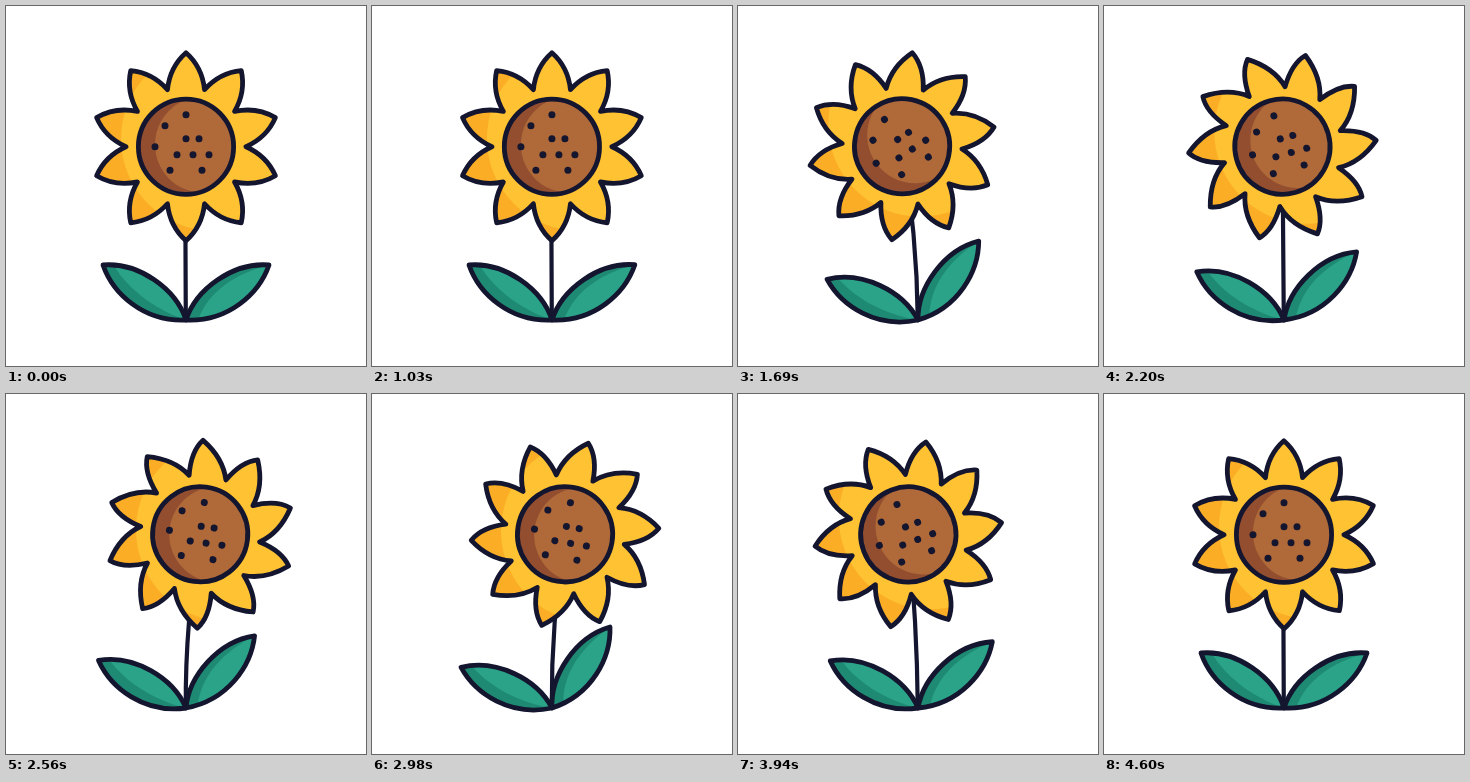
An HTML page with a canvas that plays this animation: 360 by 360 pixels, repeating every 4630 ms.

```html
<!DOCTYPE html>
<html>
<head>
<meta charset="utf-8">
<style>
html, body { margin: 0; height: 100%; overflow: hidden; background: #fff; }
canvas { display: block; width: 360px; height: 360px; }
</style>
</head>
<body>
<canvas width="360" height="360"></canvas>
<script>
const ctx = document.querySelector('canvas').getContext('2d');
const LOOP = 4630, INK = '#14152f', RAD = Math.PI / 180;

// Extremes of the swing; every move between them eases in and out
const HEAD_TIMES = [1000, 1720, 2800, 3520, 4500];
const LEAF_TIMES = [1000, 1550, 2250, 3150, 4500];

function swing(t, times, values) {
  const next = times.findIndex(time => time > t);
  if (next <= 0) return 0;
  const u = (t - times[next - 1]) / (times[next] - times[next - 1]);
  return values[next - 1] + (values[next] - values[next - 1]) * u * u * (3 - 2 * u);
}

const headTurn = t => swing(t, HEAD_TIMES, [0, -34, 15, -32, 0]);

function circlePath(x, y, r) {
  const path = new Path2D();
  path.arc(x, y, r, 0, 2 * Math.PI);
  return path;
}

// Ten petals fixed at the valleys, with tips bent sideways by an angle
function flowerPath(bend) {
  const path = new Path2D();
  const polar = (angle, r) => [r * Math.sin(angle * RAD), -r * Math.cos(angle * RAD)];
  path.moveTo(...polar(-18, 60));
  for (let a = 0; a < 360; a += 36) {
    const low = a + bend * 0.35, high = a + bend * 0.9;
    path.bezierCurveTo(...polar(low - 13, 75), ...polar(high - 6.5, 86), ...polar(a + bend, 94));
    path.bezierCurveTo(...polar(high + 6.5, 86), ...polar(low + 13, 75), ...polar(a + 18, 60));
  }
  path.closePath();
  return path;
}

const flowerLight = circlePath(27, -8, 92);
const disk = circlePath(0, 0, 47.6);
const diskLight = circlePath(17, -2, 48);
const leftLeaf = new Path2D('M0 0C-10 -31 -47 -58 -83 -55C-73 -26 -42 2 0 0Z');
const leftLight = new Path2D('M0 0C-25 -8 -58 -28 -74 -58L-20 -60L20 0Z');
const rightLeaf = new Path2D('M0 0C10 -31 47 -58 83 -55C73 -26 42 2 0 0Z');
const rightLight = new Path2D('M12 0C22 -28 48 -46 83 -55L90 10L12 10Z');
const seeds = [[0, -32], [-21, -21], [-31, 0], [0, -8], [13, -8],
  [-9, 8], [7, 8], [23, 8], [16, 23.5], [-16, 23.5]];

// A two-tone outlined shape, turned about its own origin
function part(x, y, angle, shape, light, shadeColor, lightColor, dots = []) {
  ctx.save();
  ctx.translate(x, y);
  ctx.rotate(angle * RAD);
  ctx.save();
  ctx.clip(shape);
  ctx.fillStyle = shadeColor;
  ctx.fill(shape);
  ctx.fillStyle = lightColor;
  ctx.fill(light);
  ctx.restore();
  ctx.lineWidth = 4.8;
  ctx.stroke(shape);
  ctx.fillStyle = INK;
  for (const [dx, dy] of dots) ctx.fill(circlePath(dx, dy, 3.5));
  ctx.restore();
}

function draw(t) {
  const sway = swing(t, HEAD_TIMES, [0, -16, 18.5, -16, 0]);
  const turn = headTurn(t - 30);
  const bend = headTurn(t - 130) - turn;
  const left = swing(t - 100, LEAF_TIMES, [0, -9.5, -4, -11, 0]);
  const right = swing(t, LEAF_TIMES, [0, -20, -9.5, -22, 0]);
  const headX = 180 + sway, headY = 140.7 - Math.abs(sway) * 0.03;

  ctx.fillStyle = '#fff';
  ctx.fillRect(0, 0, 360, 360);
  ctx.strokeStyle = INK;
  ctx.lineCap = ctx.lineJoin = 'round';

  ctx.lineWidth = 4.2;
  ctx.beginPath();
  ctx.moveTo(179.8, 314);
  ctx.quadraticCurveTo(179, 228, headX, headY);
  ctx.stroke();

  part(180, 314, left, leftLeaf, leftLight, '#1f8a73', '#2aa388');
  part(180, 314, right, rightLeaf, rightLight, '#1f8a73', '#2aa388');
  part(headX, headY, turn, flowerPath(bend), flowerLight, '#fbad25', '#fec233');
  part(headX, headY, turn, disk, diskLight, '#924e2f', '#b06a39', seeds);
}

function frame() {
  draw(performance.now() % LOOP);
  requestAnimationFrame(frame);
}
frame();
</script>
</body>
</html>
```
